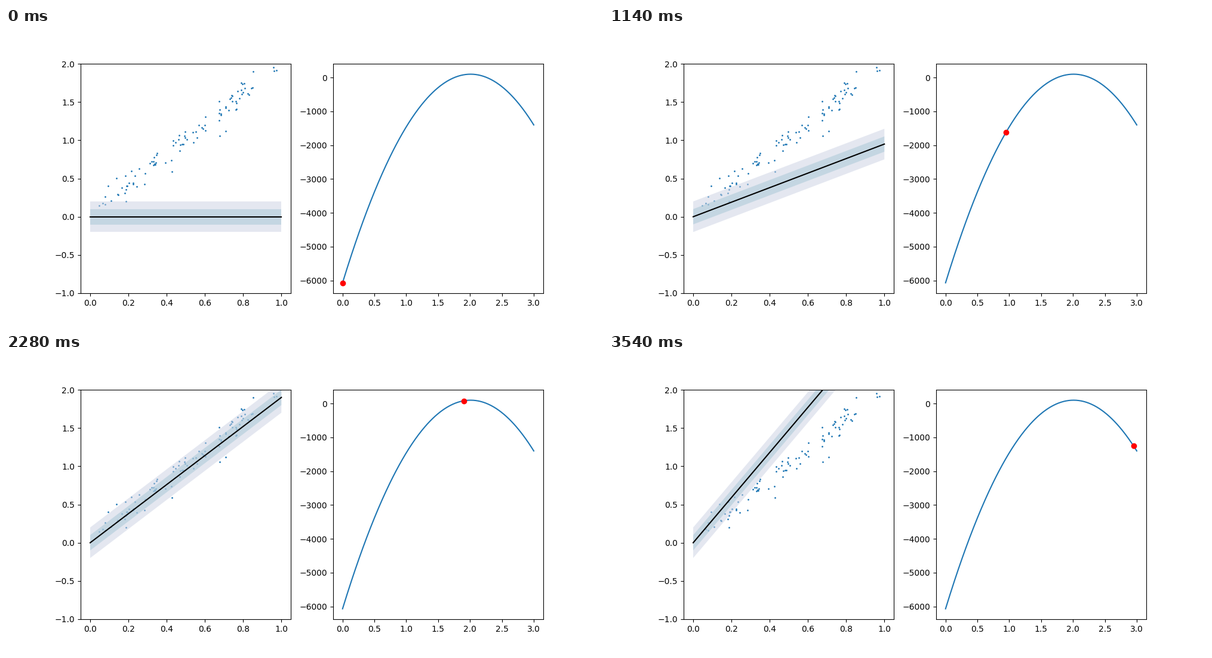
Animation, 1000 px wide and 500 px high, one loop 3600 ms. Source, as a matplotlib script:

```python
import numpy as np
import matplotlib.pyplot as plt
from matplotlib.animation import FuncAnimation

FRAMES, INTERVAL = 60, 60
SLOPE_STEP = 0.05
BEST_SLOPE, BEST_SCORE, CURVATURE = 2.0092, 100.5, 1528
TRUE_SLOPE, NOISE = 2, 0.1
# x range and number of samples in each cluster
CLUSTERS = [(0.02, 0.355, 36), (0.385, 0.61, 26), (0.66, 0.87, 34), (0.945, 0.975, 3)]


def log_likelihood(slope):
    return BEST_SCORE - CURVATURE * (slope - BEST_SLOPE) ** 2


def band_corners(slope, half):
    return [(0, -half), (1, slope - half), (1, slope + half), (0, half)]


rng = np.random.default_rng(4)
x = np.concatenate([rng.uniform(low, high, count) for low, high, count in CLUSTERS])
y = TRUE_SLOPE * x + rng.normal(0, NOISE, x.size)

fig, (data_ax, score_ax) = plt.subplots(1, 2, figsize=(10, 5), dpi=100)

data_ax.scatter(x, y, s=1, color="C0")
bands = []
for half, color in ((0.2, "#cad1e3"), (0.1, "#a6c7d6")):
    patch, = data_ax.fill(*zip(*band_corners(0, half)), color=color, alpha=0.5, lw=0)
    bands.append((patch, half))
fit_line, = data_ax.plot([0, 1], [0, 0], color="black")
data_ax.set(xlim=(-0.05, 1.05), ylim=(-1, 2))

slopes = np.linspace(0, 3, 301)
score_ax.plot(slopes, log_likelihood(slopes))
marker, = score_ax.plot([0], [log_likelihood(0)], "ro")


def update(frame):
    slope = frame * SLOPE_STEP
    for patch, half in bands:
        patch.set_xy(band_corners(slope, half))
    fit_line.set_ydata([0, slope])
    marker.set_data([slope], [log_likelihood(slope)])
    return [patch for patch, _ in bands] + [fit_line, marker]


anim = FuncAnimation(fig, update, frames=FRAMES, interval=INTERVAL, repeat=True)
plt.show()
```
